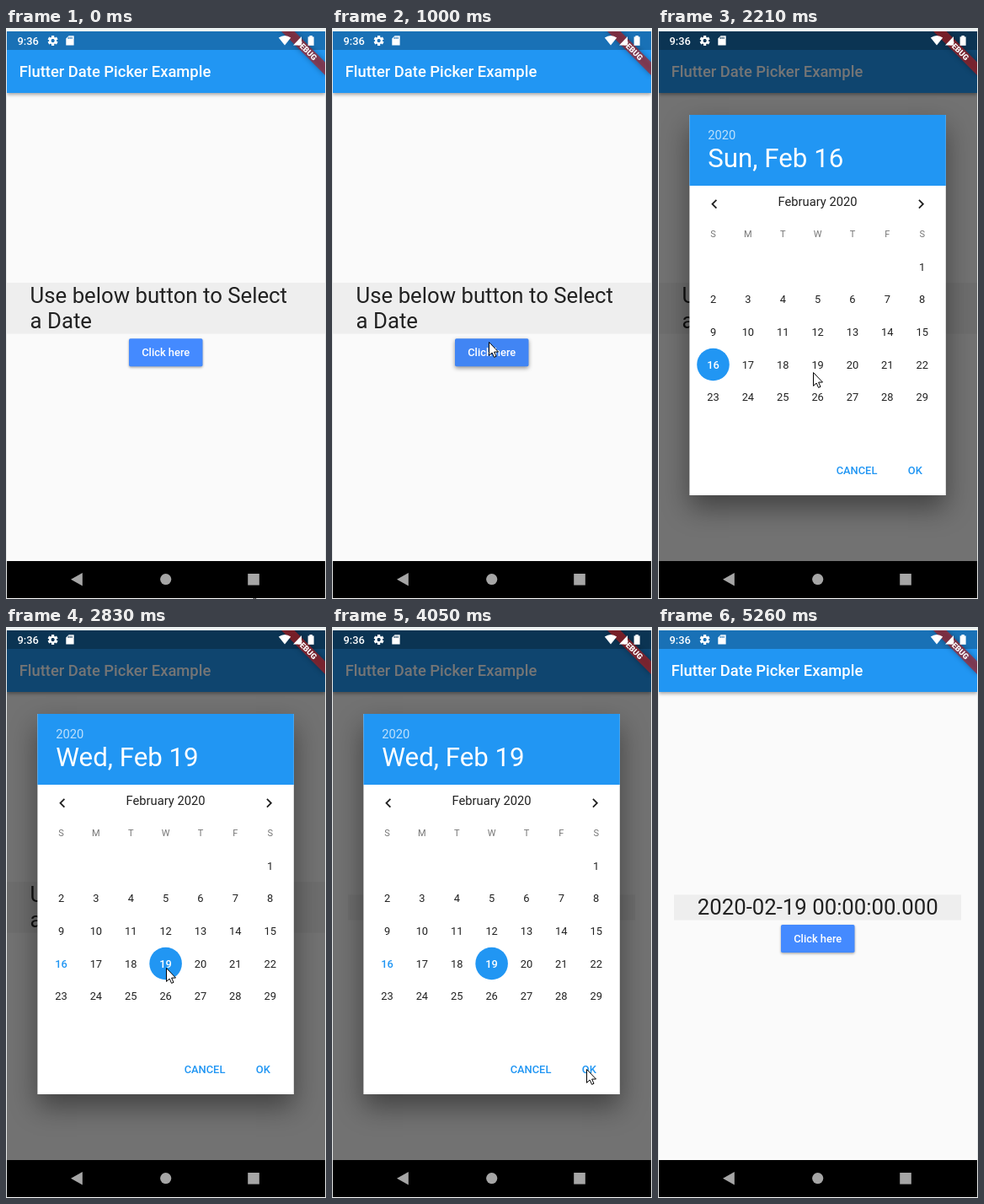
An HTML page with a canvas that plays this animation: 380x677 px, repeating every 6.89 s.

```html
<!DOCTYPE html>
<html lang="en">
<head>
<meta charset="utf-8">
<title>Date picker</title>
<style>
html, body { margin: 0; width: 100%; height: 100%; overflow: hidden; background: #fff; }
canvas { display: block; width: 380px; height: 677px; }
</style>
</head>
<body>
<canvas id="stage"></canvas>
<script>
const W = 380, H = 677, LOOP = 6890;
const DP = 378 / 411;            // stage pixels per device pixel
const LEFT = 1, RIGHT = 379, TOP = 4, NAV = 632;
const BLUE = '#2196f3', INK = '#212121';

const canvas = document.getElementById('stage');
const ratio = window.devicePixelRatio || 1;
canvas.width = W * ratio;
canvas.height = H * ratio;
const ctx = canvas.getContext('2d');

// Pointer tip: [start time, x, y]; no position means hidden.
const POINTER = [
  [0, 294, 674], [200, 215, 497], [400, 196, 426], [600, 186, 372],
  [1810, 186, 378], [2010, 147, 414], [2210, 184, 408], [2430, 190, 404],
  [3230, 327, 532], [3430, 318, 530], [3650, 290, 513], [3860, 302, 524],
  [4860, 300, 524], [5060, 303, 671], [5260]
];
const PRESS = 1000, OPEN = 1420, PICK = 2830, CHOSEN = 4050, CLOSE = 4250;

function rect(x, y, w, h, color) {
  ctx.fillStyle = color;
  ctx.fillRect(x, y, w, h);
}

function poly(points, color) {
  ctx.beginPath();
  points.forEach(([x, y]) => ctx.lineTo(x, y));
  ctx.closePath();
  ctx.fillStyle = color;
  ctx.fill();
}

function disc(x, y, r, color) {
  ctx.beginPath();
  ctx.arc(x, y, r, 0, Math.PI * 2);
  ctx.fillStyle = color;
  ctx.fill();
}

function text(str, x, y, size, color, weight = 400, align = 'left') {
  ctx.font = `${weight} ${size * DP}px Roboto, sans-serif`;
  ctx.textAlign = align;
  ctx.fillStyle = color;
  ctx.fillText(str, x, y);
}

function withShadow(color, blur, dy, draw) {
  ctx.save();
  ctx.shadowColor = color;
  ctx.shadowBlur = blur * ratio;
  ctx.shadowOffsetY = dy * ratio;
  draw();
  ctx.restore();
}

function drawButton(y, pressed) {
  withShadow(`rgba(0,0,0,${pressed ? 0.42 : 0.36})`, pressed ? 5 : 3, pressed ? 2 : 1.2, () => {
    ctx.beginPath();
    ctx.roundRect(146, y, 87.5, 33.1, 1.8);
    ctx.fillStyle = pressed ? '#4185f4' : '#448aff';
    ctx.fill();
  });
  text('Click here', 189.7, y + 21, 14, '#fff', 500, 'center');
}

function drawApp(chosen, pressed) {
  rect(LEFT, TOP, RIGHT - LEFT, NAV - TOP, '#fafafa');
  withShadow('rgba(0,0,0,0.35)', 4, 1.5, () => rect(LEFT, 26, RIGHT - LEFT, 51, BLUE));
  rect(LEFT, TOP, RIGHT - LEFT, 22, '#1971b6');
  text('Flutter Date Picker Example', 15.7, 58, 20, '#fff', 500);
  if (chosen) {
    rect(19, 317.4, 341, 30.2, '#eee');
    text('2020-02-19 00:00:00.000', 46.8, 341, 28, INK);
    drawButton(353, false);
  } else {
    rect(LEFT, 302, RIGHT - LEFT, 60.5, '#eee');
    text('Use below button to Select', 28.6, 326, 28, INK);
    text('a Date', 28.6, 356, 28, INK);
    drawButton(368.2, pressed);
  }
}

function drawChevron(x, y, dir) {
  const s = DP * dir;
  poly([[3.41, -4.59], [2, -6], [-4, 0], [2, 6], [3.41, 4.59], [-1.17, 0]]
    .map(([px, py]) => [x + px * s, y + py * DP]), INK);
}

function drawDialog(selected) {
  rect(LEFT, TOP, RIGHT - LEFT, NAV - TOP, 'rgba(0,0,0,0.54)');
  withShadow('rgba(0,0,0,0.42)', 30, 15, () => rect(37.4, 103, 304.4, 451, '#fff'));
  rect(37.4, 103, 304.4, 84, BLUE);
  text('2020', 59.3, 132, 16, 'rgba(255,255,255,0.7)');
  text(selected === 16 ? 'Sun, Feb 16' : 'Wed, Feb 19', 59.3, 164.8, 34, '#fff');

  drawChevron(66.9, 208.8, 1);
  drawChevron(312.4, 208.8, -1);
  text('February 2020', 189.5, 211, 16, INK, 400, 'center');

  const colX = i => 65.5 + 41.37 * i;
  [...'SMTWTFS'].forEach((d, i) =>
    text(d, colX(i), 248.4, 12, 'rgba(0,0,0,0.54)', 400, 'center'));
  for (let day = 1; day <= 29; day++) {
    const cell = day + 5;
    const x = colX(cell % 7), y = 283.2 + 38.6 * Math.floor(cell / 7);
    const on = day === selected, today = day === 16;
    if (on) disc(x, y, 19.3, BLUE);
    text(day, x, y + 4.5, 14, on ? '#fff' : today ? BLUE : INK,
      on || today ? 500 : 400, 'center');
  }
  text('CANCEL', 236, 529.4, 14, BLUE, 500, 'center');
  text('OK', 305.3, 529.4, 14, BLUE, 500, 'center');
}

function drawBanner() {
  ctx.save();
  ctx.beginPath();
  ctx.rect(LEFT, TOP, RIGHT - LEFT, NAV - TOP);
  ctx.clip();
  ctx.translate(RIGHT, TOP);
  ctx.rotate(Math.PI / 4);
  const h = 12 * DP, y = 28 * DP, half = 40 * DP;
  withShadow('rgba(0,0,0,0.5)', 6, 0, () => rect(-half, y, half * 2, h, 'rgba(183,28,28,0.63)'));
  text('DEBUG', 0, y + h / 2 + 3.3, 10.2, '#fff', 900, 'center');
  ctx.restore();
}

function drawGear(x, y) {
  ctx.save();
  ctx.translate(x, y);
  for (let i = 0; i < 6; i++) {
    rect(-1.6, -6, 3.2, 4, '#fff');
    ctx.rotate(Math.PI / 3);
  }
  ctx.beginPath();
  ctx.arc(0, 0, 3.2, 0, Math.PI * 2);
  ctx.lineWidth = 2.4;
  ctx.strokeStyle = '#fff';
  ctx.stroke();
  disc(0, 0, 2, ctx.dimmed ? '#0b3454' : '#1971b6');
  ctx.restore();
}

function drawStatus(dimmed) {
  ctx.dimmed = dimmed;
  text('9:36', 13.5, 19.6, 14, '#fff', 500);
  drawGear(55.6, 15);
  poly([[74.5, 9.2], [80.6, 9.2], [80.6, 20.4], [71.3, 20.4], [71.3, 12.4]], '#fff');
  const slot = dimmed ? '#0b3454' : '#1971b6';
  [74, 76, 78].forEach(x => rect(x - 0.4, 10.6, 1, 2.4, slot));

  ctx.beginPath();
  ctx.moveTo(331, 20.4);
  ctx.lineTo(323.8, 11.6);
  ctx.quadraticCurveTo(331, 6.6, 338.2, 11.6);
  ctx.closePath();
  ctx.fillStyle = '#fff';
  ctx.fill();
  poly([[341, 20.4], [351, 20.4], [351, 10]], '#fff');
  rect(358.6, 10.4, 7, 10.4, '#fff');
  rect(360.4, 9, 3.4, 2, '#fff');
}

function drawNav() {
  rect(LEFT, NAV, RIGHT - LEFT, 44, '#000');
  poly([[77, 653.8], [90.8, 646], [90.8, 661.6]], '#a6a6a6');
  disc(189.7, 653.6, 6.6, '#a6a6a6');
  rect(287.2, 647, 13.6, 13.6, '#a6a6a6');
}

function drawPointer(x, y) {
  const shape = [[0.5, 0.5], [0.5, 16.4], [4.1, 13], [6.6, 18.4],
    [9, 17.3], [6.6, 12.1], [11.5, 12]];
  poly(shape.map(([px, py]) => [x + px, y + py]), '#fff');
  ctx.lineWidth = 1;
  ctx.strokeStyle = '#000';
  ctx.stroke();
}

function draw(t) {
  const open = t >= OPEN && t < CLOSE;
  ctx.setTransform(ratio, 0, 0, ratio, 0, 0);
  rect(0, 0, W, H, '#fff');
  rect(0, 0, W, TOP, '#eef3f3');
  rect(0, TOP, 1, H - TOP, '#e6e8e8');
  rect(RIGHT, TOP, 1, H - TOP, '#e6e8e8');

  ctx.save();
  ctx.beginPath();
  ctx.rect(LEFT, TOP, RIGHT - LEFT, NAV - TOP);
  ctx.clip();
  drawApp(t >= CHOSEN, t >= PRESS && t < OPEN);
  if (open) drawDialog(t < PICK ? 16 : 19);
  ctx.restore();

  drawBanner();
  drawStatus(open);
  drawNav();
  const [, x, y] = POINTER.findLast(([start]) => start <= t);
  if (x !== undefined) drawPointer(x, y);
}

const begin = performance.now();
function tick() {
  draw((performance.now() - begin) % LOOP);
  requestAnimationFrame(tick);
}
tick();
</script>
</body>
</html>
```
